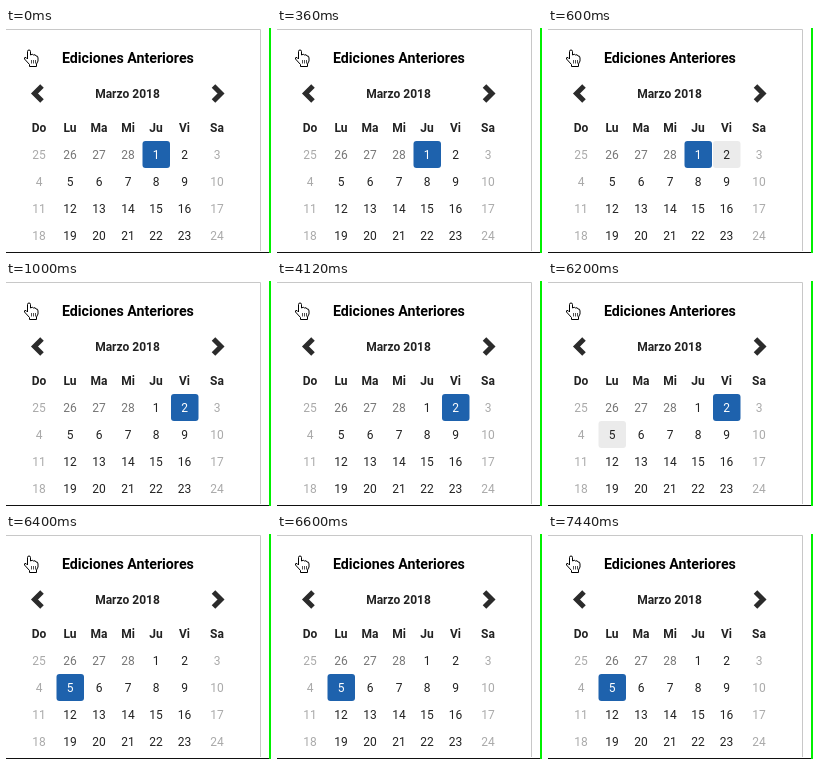
Write an HTML page that moves like this. It is 265 by 225 pixels and loops after 8 s.

```html
<!DOCTYPE html>
<html lang="es">
<meta charset="utf-8">
<title>Calendario</title>
<style>
  html, body { margin: 0; width: 100%; height: 100%; overflow: hidden; background: #fff; }
  svg { display: block; width: 265px; height: 225px; font: 12px Roboto, sans-serif; fill: #222; }
  .bold { font-weight: 700; }
  .center { text-anchor: middle; }
</style>
<svg id="stage" viewBox="0 0 265 225">
  <path d="M0 1.5H254.5V223" fill="none" stroke="#c8c8c8"/>
  <path d="M264 0V225" stroke="#00f000" stroke-width="2"/>
  <path d="M0 224.5H263" stroke="#111"/>
  <text class="bold" x="56" y="35" font-size="14.2" fill="#000">Ediciones Anteriores</text>
  <text class="bold center" x="121.5" y="70">Marzo 2018</text>
  <g fill="none" stroke="#2b2b2b" stroke-width="5">
    <path d="M36 58L28.5 65.5L36 73"/>
    <path d="M207.500 58L215 65.500L207.500 73"/>
  </g>
  <path d="M21.500 29V23.500Q21.500 22 23 22T24.500 23.500V27Q26.500 25.500 27.500 27Q29.500 26 30 28Q32 27.500 32 30V33L30.500 36V38.500H23.500V36.500L18.500 31Q18 29 20 29.500L21.500 31Z"
        fill="#fff" stroke="#000" stroke-linejoin="round"/>
  <path d="M25.500 32V35.500M27.500 32V35.500M29.500 32V35.500" stroke="#000" stroke-width=".7"/>
  <g id="calendar"></g>
</svg>
<script>
  const columns = [33, 64, 93, 122, 150, 178.5, 211];
  const names = ['Do', 'Lu', 'Ma', 'Mi', 'Ju', 'Vi', 'Sa'];
  const calendar = document.getElementById('calendar');
  const cells = {};

  function add(tag, attributes, text = '') {
    const node = document.createElementNS('http://www.w3.org/2000/svg', tag);
    for (const key in attributes) node.setAttribute(key, attributes[key]);
    node.textContent = text;
    return calendar.appendChild(node);
  }

  names.forEach((name, i) =>
    add('text', { class: 'bold center', x: columns[i], y: 104 }, name));

  for (let i = 0; i < 28; i++) {
    const column = i % 7, row = Math.floor(i / 7), day = i - 3;
    const weekend = column === 0 || column === 6;
    const color = weekend ? '#aaa' : day < 1 ? '#777' : '#222';
    const x = columns[column], y = 113 + row * 27;
    const box = add('rect', { x: x - 13.5, y, width: 27.5, height: 27, rx: 3, fill: 'none' });
    const label = add('text', { class: 'center', x, y: y + 18, fill: color },
      day < 1 ? day + 28 : day);
    cells[day] = { box, label };
  }

  function draw() {
    const time = performance.now() % 8000;
    const selected = time < 1000 ? 1 : time < 6400 ? 2 : 5;
    const hovered = time >= 600 && time < 1000 ? 2
      : time >= 6200 && time < 6400 ? 5 : 0;
    for (const day of [1, 2, 5]) {
      const { box, label } = cells[day];
      box.setAttribute('fill', day === selected ? '#1e62ad' : day === hovered ? '#ebebeb' : 'none');
      label.setAttribute('fill', day === selected ? '#fff' : '#222');
    }
    requestAnimationFrame(draw);
  }
  draw();
</script>
</html>
```
